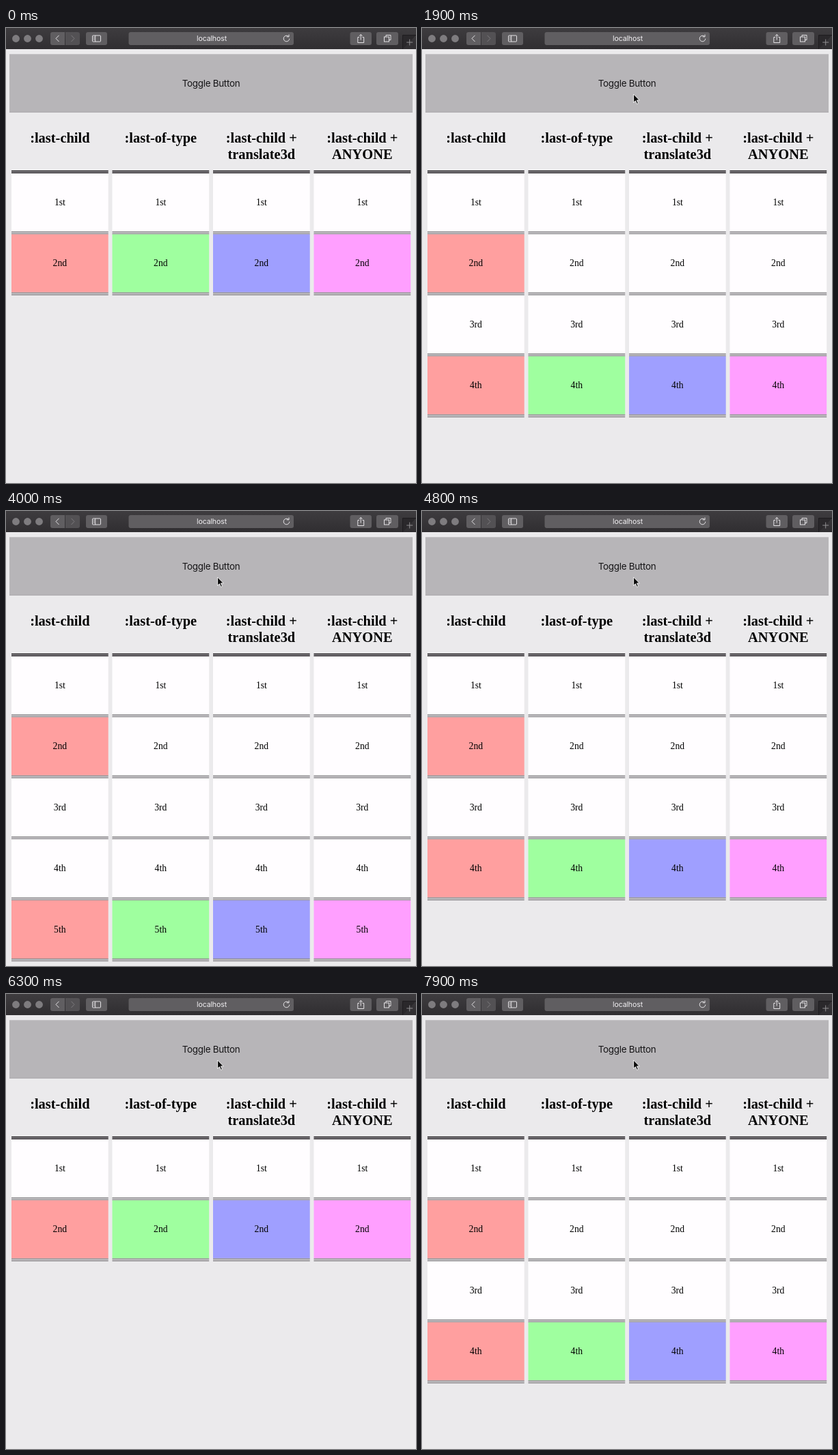
Recreate the animation shown at these times as an HTML page. Size 600 px wide and 667 px high, loop 8000 ms.

```html
<!DOCTYPE html>
<html lang="en">
<head>
<meta charset="utf-8">
<title>Toggle Button</title>
<style>
  html, body { margin: 0; width: 100%; height: 100%; overflow: hidden; background: #ebeaec; }
  svg { display: block; width: 600px; height: 667px; }
  text { text-anchor: middle; }
  .ui { font-family: Inter, sans-serif; }
  .serif { font-family: "Liberation Serif", serif; font-size: 13.67px; }
  .head { font-size: 20.45px; font-weight: bold; }
  .icon { fill: none; stroke: #e4e2e5; stroke-width: 1; }
</style>
</head>
<body>
<svg viewBox="0 0 600 667">
  <defs>
    <linearGradient id="bar" x2="0" y2="1">
      <stop offset="0" stop-color="#3e3c3f"/>
      <stop offset="1" stop-color="#302e31"/>
    </linearGradient>
  </defs>
  <rect width="600" height="667" fill="#ebeaec"/>

  <rect width="600" height="31" fill="url(#bar)"/>
  <g fill="#7e7c7f">
    <circle cx="14.5" cy="15.5" r="5.4"/>
    <circle cx="31.5" cy="15.5" r="5.4"/>
    <circle cx="48.5" cy="15.5" r="5.4"/>
  </g>
  <g fill="#605e61">
    <path d="M68 6H86V25H68a3 3 0 0 1-3-3V9a3 3 0 0 1 3-3z"/>
    <path d="M87 6H105a3 3 0 0 1 3 3V22a3 3 0 0 1-3 3H87z" fill="#535154"/>
    <rect x="117" y="6" width="31" height="19" rx="3"/>
    <rect x="179.5" y="6" width="241.5" height="19" rx="3"/>
    <rect x="503.5" y="6" width="31.5" height="19" rx="3"/>
    <rect x="542" y="6" width="32" height="19" rx="3"/>
  </g>
  <path d="M77.5 10.8L73 15.4L77.5 20" class="icon" stroke-width="1.3"/>
  <path d="M95.5 10.8L100 15.4L95.5 20" class="icon" style="stroke:#7d7b7e"/>
  <g class="icon">
    <rect x="126.5" y="11" width="12" height="9" rx="1"/>
    <path d="M130.7 11V20M128 13.2h1.5M128 15.2h1.5M128 17.2h1.5"/>
    <path d="M413.6 12.5A4.3 4.3 0 1 0 414.8 15.6M414 9.6V12.9H410.7"/>
    <path d="M517 13.5H514.8V21.5H523.7V13.5H521.5M519.2 17.5V9.6M516.9 11.8L519.2 9.4L521.5 11.8"/>
    <path d="M556 13V10.5H563V17.5H560.5"/>
    <rect x="553.5" y="13" width="7" height="7"/>
  </g>
  <path d="M580.5 31V10.5H600" fill="#2a282b" stroke="#1e1c1f"/>
  <path d="M586.2 21H595.2M590.7 16.5V25.5" stroke="#918f92"/>
  <text class="ui" x="301" y="19.4" font-size="10.6" letter-spacing="-.15" fill="#f2f0f3">localhost</text>

  <rect x="5" y="38.3" width="590" height="85.5" fill="#b7b5b8"/>
  <path d="M5 123.4H595" stroke="#aaa8ab" stroke-width=".8"/>
  <text id="label" class="ui" x="300" y="85.6" font-size="13.4" letter-spacing="-.27">Toggle Button</text>

  <g id="table" class="serif"></g>

  <path id="cursor" d="M0 0V12.3L2.8 9.7L4.9 14.3L6.9 13.4L4.9 8.9H8.7Z"
        fill="#0a0a0a" stroke="#fff" stroke-width=".9" stroke-linejoin="round"/>
</svg>
<script>
const LOOP = 8000, STEP = 100;
const LEFT = 8, TOP = 213, PITCH_X = 147.5, PITCH_Y = 89.45, WIDTH = 141.7;
const WHITE = '#fffdff';
const columns = [
  { title: [':last-child'], color: '#ff9f9f', sticky: 1 },
  { title: [':last-of-type'], color: '#9fff9f' },
  { title: [':last-child +', 'translate3d'], color: '#9f9fff' },
  { title: [':last-child +', 'ANYONE'], color: '#ff9fff' }
];
const ordinals = ['1st', '2nd', '3rd', '4th', '5th'];

// [press time, release time, rows after release]
const clicks = [
  [900, 1100, 5], [1700, 1900, 4], [2300, 2500, 3], [2900, 3100, 2],
  [3800, 4000, 5], [4600, 4800, 4], [5300, 5500, 3], [5900, 6300, 2],
  [6900, 7100, 5], [7800, 7900, 4]
];

const $ = id => document.getElementById(id);

function add(parent, tag, attrs, text) {
  const el = document.createElementNS('http://www.w3.org/2000/svg', tag);
  for (const key in attrs) el.setAttribute(key, attrs[key]);
  if (text) el.textContent = text;
  return parent.appendChild(el);
}

function doubleLine(parent, x, y, color, gap) {
  add(parent, 'rect', { x, y, width: WIDTH, height: 4.2, fill: gap });
  for (const dy of [0, 2.7])
    add(parent, 'rect', { x, y: y + dy, width: WIDTH, height: 1.5, fill: color });
}

const cells = [];
columns.forEach((col, c) => {
  const x = LEFT + c * PITCH_X, mid = x + WIDTH / 2;
  col.title.forEach((line, i) =>
    add($('table'), 'text', { class: 'head', x: mid, y: 167.8 + 24 * i }, line));
  doubleLine($('table'), x, 208.9, '#100c10', '#d8d6d9');
  ordinals.forEach((name, r) => {
    const y = TOP + r * PITCH_Y, g = add($('table'), 'g', {});
    const fill = add(g, 'rect', { x, y, width: WIDTH, height: 85.4 });
    doubleLine(g, x, y + 85.2, '#8e8c8f', '#dedcdf');
    add(g, 'text', { x: mid, y: y + 47 }, name);
    cells.push({ g, fill, col, r });
  });
});

function draw(time) {
  const t = Math.floor(time % LOOP / STEP) * STEP;
  let rows = 2, pressed = false;
  for (const [down, up, count] of clicks) {
    if (t >= up) rows = count;
    else if (t >= down) pressed = true;
  }
  $('label').setAttribute('fill', pressed ? '#fff' : '#151416');

  for (const { g, fill, col, r } of cells) {
    g.setAttribute('display', r < rows ? 'inline' : 'none');
    fill.setAttribute('fill', r === rows - 1 || r === col.sticky ? col.color : WHITE);
  }

  const u = Math.min(1, Math.max(0, (t - 200) / 500));
  const e = 1 - (1 - u) ** 2;
  $('cursor').setAttribute('display', t < 200 ? 'none' : 'inline');
  $('cursor').setAttribute('transform', `translate(${158 + 151.6 * e} ${127.5 - 30.5 * e})`);
}

const start = performance.now();
function tick() {
  draw(performance.now() - start);
  requestAnimationFrame(tick);
}
tick();
</script>
</body>
</html>
```
